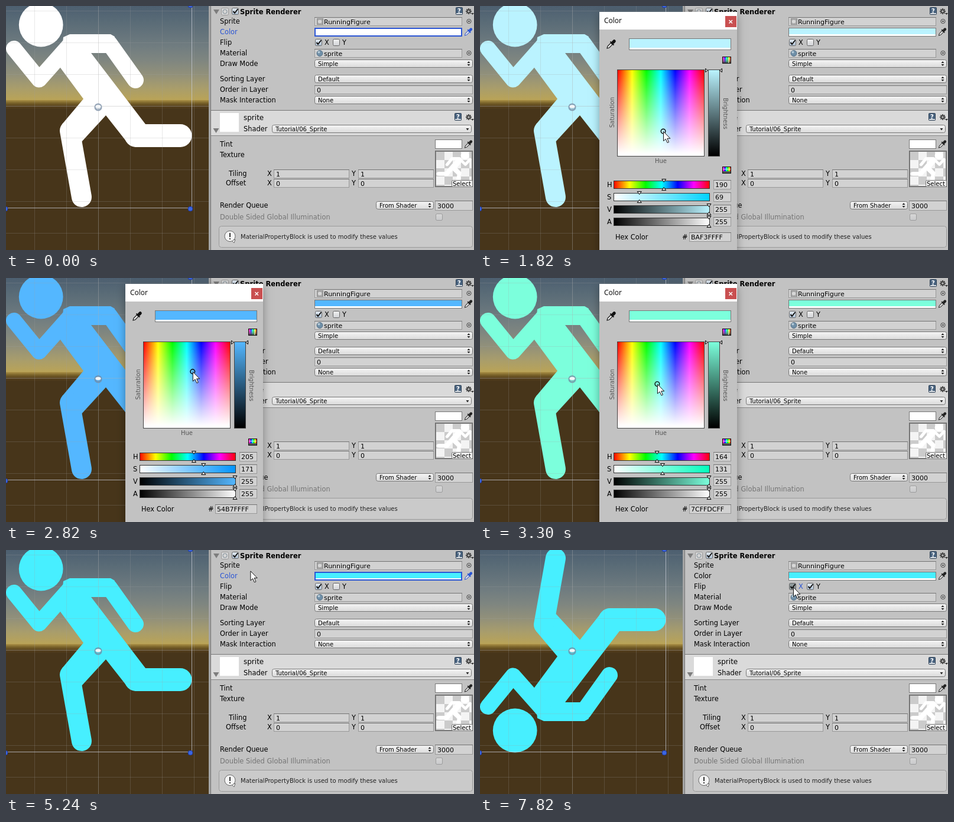
Animation of 792x415 px, one loop 8 s. Source, as an HTML page with a canvas:

```html
<!DOCTYPE html>
<html lang="en">
<head>
<meta charset="utf-8">
<title>Sprite Renderer</title>
<style>
html, body { margin: 0; width: 100%; height: 100%; overflow: hidden; background: #c2c2c2; }
canvas { display: block; }
</style>
</head>
<body>
<canvas id="stage" width="792" height="415"></canvas>
<script>
const c = document.getElementById('stage').getContext('2d');
const LOOP = 8000, SANS = '"DejaVu Sans", Verdana, sans-serif';
const LABEL = `11.4px ${SANS}`, FIELD = `11px ${SANS}`, SMALL = `10px ${SANS}`;
const BLUE = '#2b55d4';

// ---- timing -------------------------------------------------------------
const MOVES = [[240, 716, 414], [600, 690, 200], [950, 630, 37], [1050, 623, 43], [1250, 623, 43], [1600, 306, 226]];
const PICKS = [[1600, 180, 45], [1800, 190.5, 68.7], [2400, 238.5, 202.4], [3300, 164.05, 130.7], [3800, 185.2, 183.7]];
const AFTER = [[4200, 308, 152], [4250, 328, 131], [4600, 424, 26], [4700, 424, 26], [4900, 380, 25], [5150, 380, 25],
  [5400, 547, 77], [5550, 531, 61], [6700, 531, 61], [6900, 561, 62], [7500, 561, 62], [7750, 530, 63]];
const between = (t, a, b) => t >= a && t < b;

function along(keys, t) {
  if (t <= keys[0][0]) return keys[0].slice(1);
  for (let i = 1; i < keys.length; i++) {
    const a = keys[i - 1], b = keys[i];
    if (t < b[0]) {
      const k = (t - a[0]) / (b[0] - a[0]);
      return [a[1] + (b[1] - a[1]) * k, a[2] + (b[2] - a[2]) * k];
    }
  }
  return keys[keys.length - 1].slice(1);
}

function stateAt(t) {
  const step = Math.floor(t / 50) * 50;
  const [hue, sat] = step < 1600 ? [0, 0] : along(PICKS, step);
  const mark = [310 + (hue - 190.3) / 2.6, 213 - (sat - 68.8) / 1.888];
  const cursor = t < 240 ? null : step < 1600 ? along(MOVES, step) : step < 4200 ? mark : along(AFTER, step);
  const rgb = [5, 3, 1].map(n => {
    const k = (n + hue / 60) % 6;
    return Math.round(255 - sat * Math.max(0, Math.min(k, 4 - k, 1)));
  });
  const open = between(t, 1260, 4700);
  return {
    hue, sat, mark, cursor, rgb, open,
    color: `rgb(${rgb})`,
    flipX: !between(t, 5900, 6440),
    flipY: between(t, 7030, 7310) || t >= 7460,
    focus: t < 5750 ? (open ? '' : 'color') : between(t, 6980, 7820) ? 'y' : 'x',
    pressX: between(t, 5750, 5900) || between(t, 6290, 6440) || t >= 7820,
    pressY: between(t, 6980, 7030) || between(t, 7210, 7310) || between(t, 7400, 7460)
  };
}

// ---- helpers ------------------------------------------------------------
function rect(x, y, r, b, fill, line) {
  if (fill) { c.fillStyle = fill; c.fillRect(x, y, r - x, b - y); }
  if (line) { c.strokeStyle = line; c.lineWidth = 1; c.strokeRect(x + .5, y + .5, r - x - 1, b - y - 1); }
}
function round(x, y, r, b, rad, fill, line) {
  c.beginPath(); c.roundRect(x + .5, y + .5, r - x - 1, b - y - 1, rad);
  c.fillStyle = fill; c.fill();
  c.strokeStyle = line; c.lineWidth = 1; c.stroke();
}
function text(s, x, y, font = LABEL, fill = '#000') {
  c.font = font; c.fillStyle = fill; c.fillText(s, x, y);
}
function path(pts, close) {
  c.beginPath();
  for (let i = 0; i < pts.length; i += 2) c.lineTo(pts[i], pts[i + 1]);
  if (close) c.closePath();
}
function shape(pts, fill, line) {
  path(pts, true);
  if (fill) { c.fillStyle = fill; c.fill(); }
  if (line) { c.strokeStyle = line; c.lineWidth = 1; c.stroke(); }
}
function stroke(pts, width, color) {
  path(pts); c.lineWidth = width; c.strokeStyle = color; c.stroke();
}
function disc(x, y, r, fill, line, width = 1) {
  c.beginPath(); c.arc(x, y, r, 0, 7);
  if (fill) { c.fillStyle = fill; c.fill(); }
  if (line) { c.strokeStyle = line; c.lineWidth = width; c.stroke(); }
}
function ramp(x0, y0, x1, y1, colors) {
  const g = c.createLinearGradient(x0, y0, x1, y1);
  colors.forEach((v, i) => g.addColorStop(i / (colors.length - 1), v));
  return g;
}
const rainbow = (x0, x1) => ramp(x0, 0, x1, 0, ['#f00', '#ff0', '#0f0', '#0ff', '#00f', '#f0f', '#f00']);

function field(x, y, r, b, value, tx = x + 4) {
  rect(x, y, r, b, '#d2d2d2', '#999');
  rect(x, y, r, y + 1, '#737373');
  text(value, tx, (y + b) / 2 + 4, FIELD);
}
function dropdown(x, y, r, b, value, single) {
  round(x, y, r, b, 3, ramp(0, y, 0, b, ['#f6f6f6', '#d9d9d9']), '#777');
  text(value, x + 6, (y + b) / 2 + 3.5, SMALL);
  const ax = r - 7, ay = (y + b) / 2;
  if (single) shape([ax - 2.5, ay - 1, ax + 2.5, ay - 1, ax, ay + 2.5], '#222');
  else {
    shape([ax - 2.5, ay - 1, ax + 2.5, ay - 1, ax, ay - 4], '#222');
    shape([ax - 2.5, ay + 1, ax + 2.5, ay + 1, ax, ay + 4], '#222');
  }
}
function checkbox(x, y, on, pressed) {
  const light = on ? ['#eaf0f6', '#a9bdd2'] : ['#f2f2f2', '#d0d2d6'];
  round(x, y, x + 12, y + 12, 2, pressed ? '#8f9a9c' : ramp(0, y, 0, y + 12, light), '#666');
  if (on) stroke([x + 2.5, y + 6, x + 5, y + 9, x + 10.5, y + 2], 2, '#111');
}
function dropper(x, y, s, color) {
  c.save(); c.translate(x, y); c.scale(s, s); c.rotate(Math.PI / 4);
  shape([-1.7, -1, 1.7, -1, 1.7, 6, 0, 9, -1.7, 6], '#e4e4e4', color);
  rect(-3.8, -2.8, 3.8, -1, color);
  round(-2.4, -9, 2.4, -2, 2, color, color);
  c.restore();
}
function headerIcons(x, y) {
  round(x - 6, y - 7, x + 6, y + 6, 1, '#4a6480', '#2a3d52');
  rect(x - 5, y + 3, x + 5, y + 5, '#d8dde2');
  text('?', x - 3, y + 2.5, `bold 10px ${SANS}`, '#fff');
  for (let i = 0; i < 4; i++) {
    const a = i * Math.PI / 4, dx = 5 * Math.cos(a), dy = 5 * Math.sin(a);
    stroke([783 - dx, y - dy, 783 + dx, y + dy], 2, '#444');
  }
  disc(783, y, 2.4, '#c2c2c2', '#444', 1.6);
  shape([787, y + 3, 792, y + 3, 789.5, y + 6], '#333');
}
const foldout = (x, y) => shape([x - 5, y - 4, x + 5, y - 4, x, y + 4], '#7d7d7d');

// ---- running figure -----------------------------------------------------
const BODY = [97, 53, 108, 48, 177, 48, 184, 52, 177, 80, 144, 80, 236, 201, 295, 201, 295, 240, 219, 240,
  205, 232, 169, 186, 127, 232, 110, 226, 95, 201, 131, 158, 92, 105];
function figure(color) {
  c.lineCap = c.lineJoin = 'round';
  disc(59.2, 32, 37.4, color);
  shape(BODY, color);
  stroke([13.5, 72.5, 56, 125, 108, 66], 27, color);
  stroke([175, 64, 219, 126], 28, color);
  stroke([220, 220.5, 295, 220.5], 39, color);
  stroke([108, 212, 128, 325], 34, color);
  c.lineCap = 'butt'; c.lineJoin = 'miter';
}

function scene(s) {
  c.save();
  c.beginPath(); c.rect(0, 0, 343, 415); c.clip();
  rect(0, 0, 343, 162, ramp(0, 0, 0, 162, ['#4d5f70', '#586a76', '#64737b', '#717d80', '#7f8680', '#91907a', '#a89d6c', '#bba455']));
  rect(0, 160, 343, 176, ramp(0, 160, 0, 176, ['#a98f45', '#776028', '#553f1c', '#47351a']));
  rect(0, 176, 343, 415, '#47351a');

  c.save();
  c.translate(156.7, 169.5); c.scale(s.flipX ? 1 : -1, s.flipY ? -1 : 1); c.translate(-156.7, -169.5);
  figure(s.color);
  c.restore();

  for (let k = -3; k < 5; k++) {
    const shade = k ? 'rgba(160,160,160,.24)' : 'rgba(175,175,175,.42)';
    rect(156 + 54 * k, 0, 157 + 54 * k, 415, shade);
    rect(0, 170 + 54 * k, 343, 171 + 54 * k, shade);
  }
  rect(314, 0, 315, 343, 'rgba(200,205,215,.75)');
  rect(0, 343, 315, 344, 'rgba(200,205,215,.75)');
  for (const [x, y] of [[312, -1], [312, 345], [-1, 345]]) disc(x, y, 4, '#3c66e0', '#1b36a0');
  disc(156, 172, 5.5, 'rgba(110,135,160,.4)', 'rgba(115,135,160,.7)', 2.2);
  c.beginPath(); c.ellipse(156, 171, 4.6, 2.8, 0, 0, 7);
  c.fillStyle = '#f4f6f8'; c.fill();
  c.restore();
}

// ---- inspector ----------------------------------------------------------
function colorField(x, y, r, b, color, line) {
  rect(x, y, r, b, '#fff');
  rect(x, y, r, b - 4, color);
  rect(x, y, r, b, null, line);
}
function thumbnail() {
  c.save();
  c.beginPath(); c.rect(726, 246, 64, 62); c.clip();
  rect(726, 246, 790, 308, '#f4f4f4');
  for (let i = 0; i < 5; i++)
    for (let j = 0; j < 5; j++)
      if ((i + j) % 2 === 0) rect(728 + i * 14, 248 + j * 14, 742 + i * 14, 262 + j * 14, '#cbcbcb');
  c.translate(788, 249); c.scale(-.19, .165);
  figure('#fff');
  c.restore();
  rect(726, 246, 790, 308, null, '#666');
  rect(727, 247, 789, 307, null, '#888');
  round(754, 296, 790, 308, 2, '#f0f0f0', '#777');
  text('Select', 756, 306, SMALL);
}
function inspector(s) {
  rect(343, 0, 792, 415, '#c2c2c2');
  rect(343, 0, 347, 415, '#a4a4a4');
  rect(346, 0, 347, 415, '#777');

  foldout(356, 10);
  round(364, 3, 377, 16, 2, '#d5d5d5', '#999');
  disc(370.5, 9.5, 3.5, null, '#7d8c96');
  checkbox(382, 3, true);
  text('Sprite Renderer', 396, 14, `bold 11.5px ${SANS}`);
  headerIcons(767, 9);

  const colorOn = s.focus === 'color';
  [['Sprite', 30], ['Color', 48, colorOn], ['Flip', 66], ['Material', 84], ['Draw Mode', 102],
    ['Sorting Layer', 128], ['Order in Layer', 146], ['Mask Interaction', 164]]
    .forEach(([name, y, on]) => text(name, 362, y, LABEL, on ? BLUE : '#000'));

  field(522, 19, 772, 34, 'RunningFigure', 538);
  rect(526, 21, 537, 32, '#aaa', '#888');
  disc(531, 26.5, 3, '#d8d8d8');
  for (const y of [26, 80]) { disc(783.5, y, 3.6, null, '#444'); disc(783.5, y, 1.2, '#333'); }

  colorField(522, 37, 772, 52, s.color, colorOn ? BLUE : '#777');
  if (colorOn) rect(523, 38, 771, 51, null, BLUE);
  dropper(782.5, 44, .95, colorOn ? BLUE : '#222');

  checkbox(523, 56, s.flipX, s.pressX);
  text('X', 539, 66, LABEL, s.focus === 'x' ? BLUE : '#000');
  checkbox(553, 56, s.flipY, s.pressY);
  text('Y', 569, 66, LABEL, s.focus === 'y' ? BLUE : '#000');

  field(522, 73, 772, 88, 'sprite', 538);
  disc(531, 80.5, 5, '#6f8fa8', '#566f83');
  disc(529.5, 78.5, 2, '#b4cad8');
  dropdown(522, 91, 790, 105, 'Simple');
  dropdown(522, 117, 790, 131, 'Default');
  field(522, 135, 790, 150, '0');
  dropdown(522, 153, 790, 167, 'None');

  rect(347, 177, 792, 221, '#dadada');
  rect(347, 177, 792, 178, '#777');
  rect(347, 220, 792, 221, '#888');
  rect(362, 182, 394, 214, '#fff');
  foldout(355.5, 212);
  text('sprite', 402, 194, `12px ${SANS}`);
  text('Shader', 402, 213);
  dropdown(450, 202, 788, 216, 'Tutorial/06_Sprite', true);
  headerIcons(765, 189);

  text('Tint', 362, 239);
  rect(726, 227, 772, 243, '#fff', '#777');
  dropper(782.5, 235, .95, '#222');
  text('Texture', 362, 257);
  thumbnail();
  [['Tiling', '1', 377, 278], ['Offset', '0', 372, 294]].forEach(([name, value, x, y]) => {
    text(name, x, y + 11);
    text('X', 442, y + 11);
    field(453, y, 581, y + 15, value);
    text('Y', 585, y + 11);
    field(596, y, 724, y + 15, value);
  });

  text('Render Queue', 362, 343);
  dropdown(626, 332, 724, 346, 'From Shader');
  field(726, 331, 790, 348, '3000');
  text('Double Sided Global Illumination', 362, 363, LABEL, '#757575');
  c.globalAlpha = .45; checkbox(727, 353, false); c.globalAlpha = 1;

  round(360, 374, 790, 411, 4, '#cacaca', '#9a9a9a');
  shape([382, 399, 388, 397, 386, 403], '#f5f5f5', '#666');
  disc(379, 391.5, 9, '#f5f5f5', '#666');
  rect(378, 386, 380, 393, '#333');
  rect(378, 395, 380, 397, '#333');
  text('MaterialPropertyBlock is used to modify these values', 397, 396, SMALL, '#222');
}

// ---- color picker -------------------------------------------------------
function sideways(s, x, y, angle) {
  c.save(); c.translate(x, y); c.rotate(angle); c.textAlign = 'center';
  text(s, 0, 3.5, SMALL, '#555');
  c.restore();
}
function slider(name, y, value, max, fill) {
  text(name, 215, y + 11);
  rect(226, y, 389, y + 14, fill, '#333');
  const x = 226 + 161.5 * value / max;
  shape([x - 3.5, y - 2.5, x + 3.5, y - 2.5, x, y + 2.5], '#ddd', '#000');
  shape([x - 3.5, y + 16.5, x + 3.5, y + 16.5, x, y + 11.5], '#ddd', '#000');
  field(395, y - 1, 425, y + 15, String(value), 398);
}
function modeIcon(y, rows) {
  rect(410, y, 425, y + 12, rainbow(424, 410), '#111');
  if (rows) { rect(411, y + 4, 424, y + 5, '#eee'); rect(411, y + 8, 424, y + 11, '#555'); }
  else { rect(411, y + 1, 424, y + 11, ramp(0, y, 0, y + 12, ['rgba(255,255,255,0)', '#222'])); rect(420, y + 1, 421, y + 11, '#ddd'); }
}
function picker(s) {
  c.save();
  c.shadowColor = 'rgba(0,0,0,.35)'; c.shadowBlur = 14; c.shadowOffsetY = 4;
  rect(202, 10, 435, 430, '#c2c2c2');
  c.restore();
  rect(202, 10, 435, 40, '#fff');
  text('Color', 210, 29, '12px "Open Sans", sans-serif');
  rect(415, 17, 434, 36, '#c94f50');
  stroke([421.5, 24, 427, 29.5], 1.5, '#fff');
  stroke([427, 24, 421.5, 29.5], 1.5, '#fff');

  dropper(222, 65, 1.1, '#111');
  colorField(252, 55, 425, 75, s.color, '#777');
  modeIcon(86, false);

  rect(232, 108, 380, 256, rainbow(233, 379));
  rect(232, 108, 380, 256, ramp(0, 109, 0, 252, ['rgba(255,255,255,0)', '#fff']), '#444');
  rect(386, 108, 406, 256, ramp(0, 109, 0, 254, [s.color, '#000']), '#444');
  shape([381.5, 106.5, 381.5, 112.5, 385.5, 109.5], '#ddd', '#000');
  shape([409.5, 106.5, 409.5, 112.5, 405.5, 109.5], '#ddd', '#000');
  disc(...s.mark, 3.8, null, '#000', 1.4);
  sideways('Saturation', 223, 181, -Math.PI / 2);
  sideways('Brightness', 415, 183, Math.PI / 2);
  text('Hue', 296, 267, SMALL, '#555');
  modeIcon(273, true);

  slider('H', 297, Math.floor(s.hue), 360, rainbow(226, 389));
  slider('S', 318, Math.ceil(s.sat), 255, ramp(226, 0, 389, 0, ['#fff', `hsl(${s.hue} 100% 50%)`]));
  slider('V', 339, 255, 255, ramp(226, 0, 389, 0, ['#000', s.color]));
  slider('A', 360, 255, 255, ramp(226, 0, 389, 0, ['#000', '#fff']));

  const hex = s.rgb.map(v => v.toString(16).padStart(2, '0')).join('').toUpperCase() + 'FF';
  text('Hex Color', 229, 397);
  text('#', 342, 397);
  field(354, 385, 425, 401, hex, 357);
}

function pointer([x, y]) {
  c.save(); c.translate(x + .5, y + .5);
  shape([0, 0, 0, 16, 3.7, 12.7, 6.5, 19, 9, 18, 6.3, 11.7, 11.3, 11.7], '#fff', '#111');
  c.restore();
}

function draw(now) {
  const s = stateAt(now % LOOP);
  scene(s);
  inspector(s);
  if (s.open) picker(s);
  if (s.cursor) pointer(s.cursor);
  requestAnimationFrame(draw);
}
requestAnimationFrame(draw);
</script>
</body>
</html>
```
